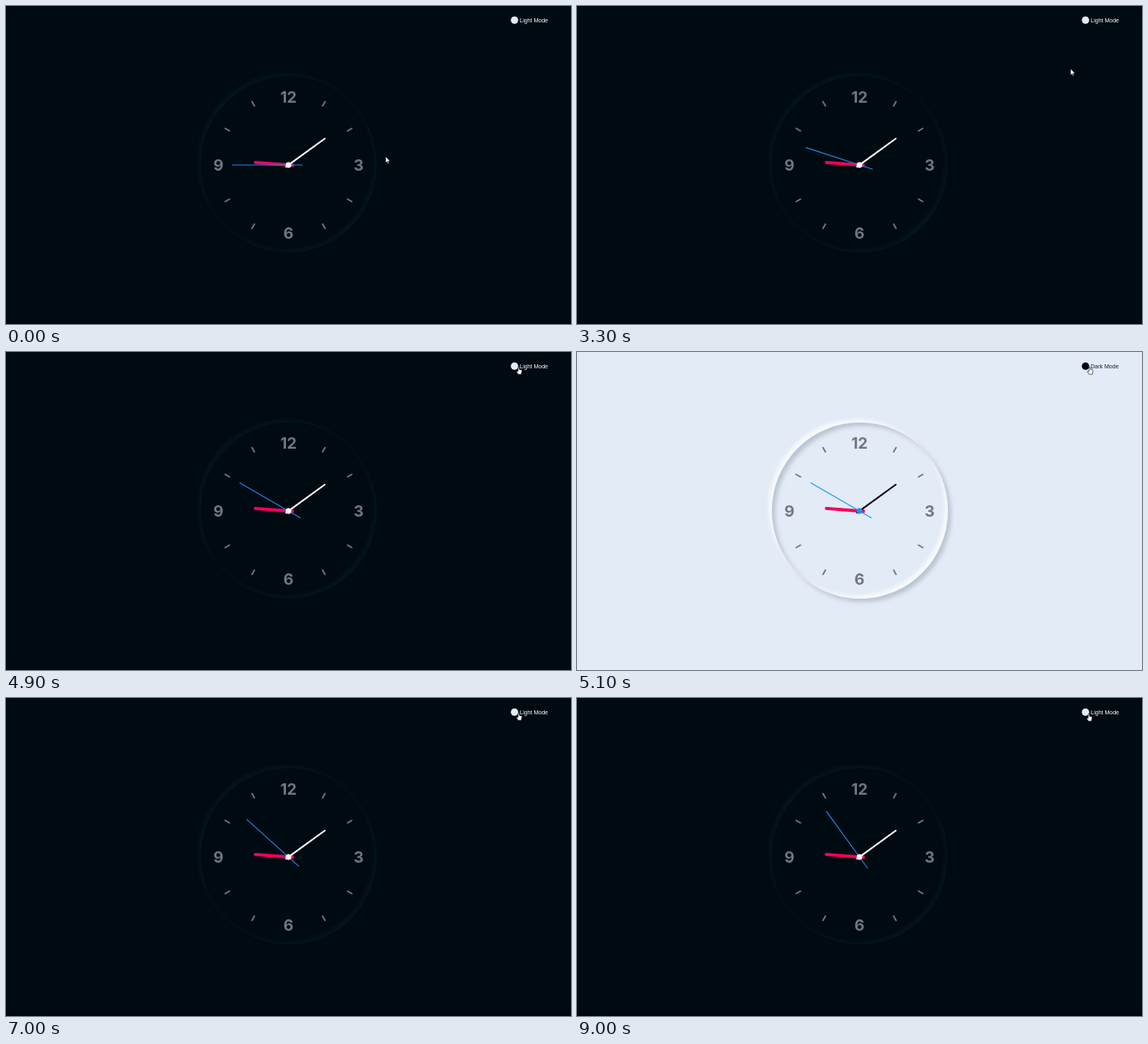
An HTML page with a canvas that plays this animation: 690x388 px, repeating every 9200 ms.

```html
<!DOCTYPE html>
<html lang="en">
<head>
<meta charset="utf-8">
<title>Clock</title>
<style>
  html, body { margin: 0; width: 100%; height: 100%; overflow: hidden; }
  body { position: relative; background: #000a11; }
  body.light { background: #e3ebf6; }
  .face {
    --shine: rgba(4, 24, 29, .75);
    --shade: transparent;
    position: absolute; left: 238px; top: 86px; width: 215px; height: 215px;
    border-radius: 50%;
    box-shadow: -4px -4px 4px var(--shine), 4px 4px 5px var(--shade),
      inset 4px 4px 5px var(--shade), inset -4px -4px 4px var(--shine);
  }
  .light .face { --shine: rgba(255, 255, 255, .75); --shade: rgba(94, 110, 130, .3); }
  canvas { position: absolute; left: 0; top: 0; display: block; }
</style>
</head>
<body>
<div class="face"></div>
<canvas id="stage" width="690" height="388"></canvas>
<script>
const ctx = document.getElementById('stage').getContext('2d');
const LOOP = 9200, STEP = 100, CX = 345, CY = 194;

const THEMES = {
  dark: { ink: '#fff', text: '#fff', hub: '#fff', toggle: '#e3ebf6', grey: '#70777e', sec: '#1e86e4', label: 'Light Mode' },
  light: { ink: '#00060e', text: '#1a2230', hub: '#1a93f5', toggle: '#000208', grey: '#73777d', sec: '#1a9cf8', label: 'Dark Mode' }
};

// pointer moves: start, end, x, y
const HOME = [463.5, 183.5];
const MOVES = [
  [1600, 2500, 601, 65],
  [2600, 2900, 602.5, 59],
  [2900, 3300, 602.8, 76.5],
  [3500, 3900, 631.5, 14],
  [4000, 4200, 634, 17],
  [4600, 4900, 626, 18],
  [8000, 9000, 625, 19]
];

function ease(t, start, end) {
  const k = Math.min(1, Math.max(0, (t - start) / (end - start)));
  return k * k * (3 - 2 * k);
}

function pointerAt(t) {
  return MOVES.reduce(([x, y], [start, end, nx, ny]) => {
    const k = ease(t, start, end);
    return [x + (nx - x) * k, y + (ny - y) * k];
  }, HOME);
}

// draws in a frame turned about the clock centre, with 12 o'clock up
function turned(deg, paint) {
  ctx.save();
  ctx.translate(CX, CY);
  ctx.rotate(deg * Math.PI / 180);
  paint();
  ctx.restore();
}

function hand(deg, length, tail, width, color, round) {
  turned(deg, () => {
    ctx.fillStyle = color;
    ctx.beginPath();
    ctx.roundRect(-width / 2, -length, width, length + tail, [round, round, 0, 0]);
    ctx.fill();
  });
}

function disc(x, y, r, color) {
  ctx.fillStyle = color;
  ctx.beginPath();
  ctx.arc(x, y, r, 0, Math.PI * 2);
  ctx.fill();
}

function dial(theme) {
  ctx.fillStyle = theme.grey;
  ctx.font = '700 19px Inter, "Open Sans", sans-serif';
  ctx.textAlign = 'center';
  for (let h = 1; h <= 12; h++) {
    const a = h * Math.PI / 6;
    if (h % 3) turned(h * 30, () => ctx.fillRect(-0.9, -90, 1.8, 7.5));
    else ctx.fillText(h, CX + 85.7 * Math.sin(a), CY + 7 - 83 * Math.cos(a));
  }
}

function toggle(theme) {
  disc(621, 17.2, 4.5, theme.toggle);
  ctx.fillStyle = theme.text;
  ctx.font = '7px "Liberation Sans", Arial, sans-serif';
  ctx.textAlign = 'left';
  ctx.fillText(theme.label, 627.3, 20);
}

const ARROW = new Path2D('M0 0V8L1.8 6.4 3 9 4.2 8.5 3.1 5.9 5.5 5.7Z');
const FINGER = new Path2D('M-.8 .8Q0-.6 .8 .8V3.2L3.4 3.7Q4.3 4 4.1 5.4L3.3 9.2H-.6L-2.7 5.9Q-2.4 4.7-.8 5.9Z');

function pointer(t) {
  const shape = t >= 3900 ? FINGER : ARROW;
  ctx.save();
  ctx.translate(...pointerAt(t));
  ctx.lineJoin = 'round';
  ctx.lineWidth = 0.6;
  ctx.strokeStyle = '#000';
  ctx.fillStyle = '#fff';
  ctx.fill(shape);
  ctx.stroke(shape);
  ctx.restore();
}

function draw(now) {
  const t = Math.floor((now % LOOP) / STEP) * STEP;
  const light = t >= 5100 && t < 7000;
  const theme = light ? THEMES.light : THEMES.dark;
  const seconds = 45 + Math.floor((t + 268) / 1013);

  document.body.classList.toggle('light', light);
  ctx.clearRect(0, 0, 690, 388);
  if (!light) {
    ctx.fillStyle = '#00070d';
    ctx.fillRect(0, 384, 690, 4);
  }
  dial(theme);
  hand(274.5, 42.5, 6.5, 3.8, '#f4005c', 2);
  hand(54, 55.8, 4.5, 2, theme.ink, 1);
  hand(seconds * 6, 69, 17, 1.2, theme.sec, 0);
  disc(CX, CY, 3.4, theme.hub);
  toggle(theme);
  pointer(t);
}

function loop() {
  draw(performance.now());
  requestAnimationFrame(loop);
}
loop();
</script>
</body>
</html>
```
